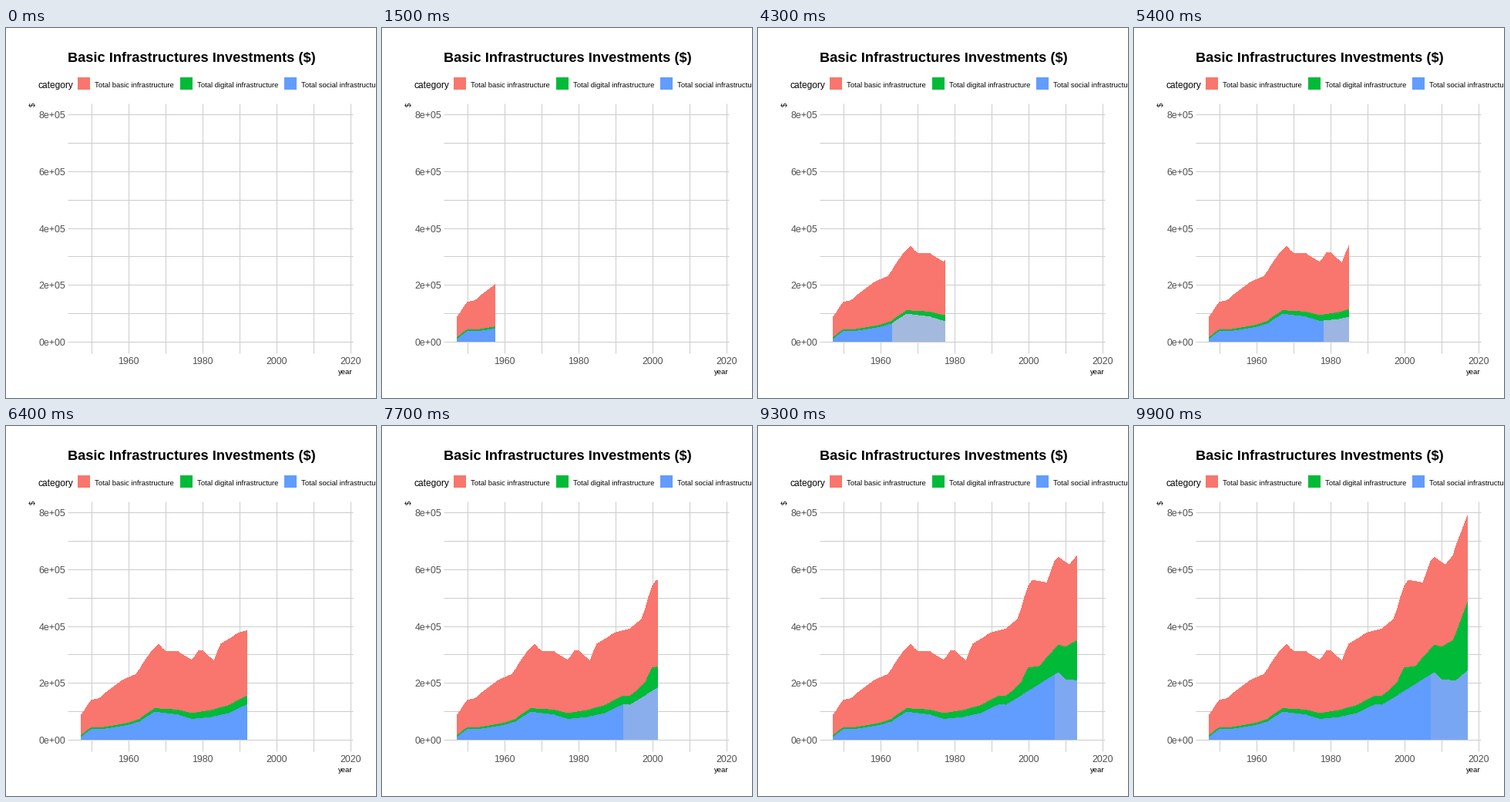
These frames come from a looping animation (480 px wide and 480 px high, 10 s). A matplotlib script:

```python
import numpy as np
import matplotlib.pyplot as plt
from matplotlib.animation import FuncAnimation

SIZE, DPI, FRAMES, INTERVAL = 480, 100, 100, 100
PT = 72 / DPI
RED, GREEN, BLUE = "#F8766D", "#00BA38", "#619CFF"
PURE = np.array([97, 156, 255]) / 255
PALE = np.array([200, 200, 204]) / 255
FIRST, LAST = 1947, 2017

plt.rcParams.update({"font.family": "Liberation Sans",
                     "text.hinting": "native"})

years = np.arange(FIRST, LAST + 1)
# Each year lands on a whole step; halfway steps fall between years
arrival = np.round((years - FIRST) * (FRAMES - 1) / (LAST - FIRST))


def curve(*points):
    """Yearly values, in thousands, through a few turning points."""
    return np.interp(years, *zip(*points))


social = curve((1947, 8), (1950, 36), (1953, 36), (1960, 51), (1963, 63),
               (1967, 97), (1973, 88), (1977, 72), (1982, 78), (1987, 92),
               (1992, 123), (1994, 122), (2008, 236), (2010, 211),
               (2014, 207), (2017, 242))
digital = social + curve((1947, 6), (1960, 7), (1973, 17), (1983, 25),
                         (1995, 33), (1998, 47), (2000, 82), (2003, 63),
                         (2008, 97), (2013, 141), (2017, 242))
total = curve((1947, 85), (1950, 139), (1952, 145), (1958, 207),
              (1962, 230), (1966, 307), (1968, 335), (1970, 310),
              (1973, 312), (1977, 279), (1979, 313), (1980, 313),
              (1983, 275), (1985, 337), (1990, 377), (1994, 390),
              (1997, 424), (2000, 541), (2001, 561), (2005, 552),
              (2007, 628), (2008, 642), (2011, 614), (2013, 647),
              (2017, 789))
floor = np.zeros(len(years))

# The newest stretch of the blue band is paler and restarts at a steady pace
restarts = np.round(23 + 20.7 * np.arange(4))


def px(year):
    return 159.15 + 4.8 * (year - 1960)


def py(value):
    return 407.05 - 0.36875 * value


fig = plt.figure(figsize=(SIZE / DPI, SIZE / DPI), dpi=DPI, facecolor="white")
ax = fig.add_axes([0, 0, 1, 1])
ax.set(xlim=(0, SIZE), ylim=(SIZE, 0))
ax.axis("off")


def label(x, y, s, size, color="black", **kw):
    ax.text(x, y, s, fontsize=size * PT, color=color,
            **{"va": "baseline", **kw})


def band(color, z):
    return ax.fill([0, 0, 0], [0, 0, 0], color=color, lw=0,
                   antialiased=False, zorder=z)[0]


grid = dict(colors="#CCCCCC", lw=PT, zorder=1)
ax.vlines([px(y) for y in range(1950, 2021, 10)], 98, 422, **grid)
ax.hlines([py(v) for v in range(0, 801, 100)], 80, 450, **grid)

label(80, 44, "Basic Infrastructures Investments ($)", 18.3, weight="bold")
label(41, 78, "category", 12)
for x, color, kind in ((93, RED, "basic"), (226, GREEN, "digital"),
                       (361, BLUE, "social")):
    ax.add_patch(plt.Rectangle((x, 64), 16, 16, color=color, lw=0))
    label(x + 22, 77, f"Total {kind} infrastructure", 9.5)
for v in range(0, 801, 200):
    label(77, py(v) + 5, f"{v * 1000:.0e}", 12.4, "#4D4D4D", ha="right")
for y in range(1960, 2021, 20):
    label(px(y) - 0.3, 436.5, str(y), 12.4, "#4D4D4D", ha="center")
label(450, 449, "year", 9.8, ha="right")
label(35, 99.5, "$", 9.8, rotation=90, ha="center", va="center")

stack = [(band(RED, 2), digital, total),
         (band(GREEN, 3), social, digital),
         (band(BLUE, 4), floor, social)]
recent = band(BLUE, 5)


def reveal(step):
    return np.interp(step, arrival, years)


def shape(patch, low, high, start, end):
    patch.set_visible(end > start)
    inner = years[(years > start) & (years < end)]
    t = np.concatenate([[start], inner, [end]])
    x = np.round(px(t))
    top, bottom = (py(np.interp(t, years, v)) for v in (high, low))
    bottom = np.minimum(bottom, 407)
    patch.set_xy(np.column_stack([np.r_[x, x[::-1]],
                                  np.r_[top, bottom[::-1]]]))


def update(step):
    end = reveal(step)
    for patch, low, high in stack:
        shape(patch, low, high, FIRST, end)
    past = restarts[restarts <= step]
    start = reveal(past[-1]) if len(past) else end
    shape(recent, floor, social, start, end)
    fade = 0.97 - 0.0074 * step
    recent.set_facecolor(PURE + (PALE - PURE) * fade)
    return [recent]


anim = FuncAnimation(fig, update, frames=FRAMES, interval=INTERVAL,
                     init_func=lambda: update(0), repeat=True,
                     repeat_delay=0, blit=False)
plt.show()
```
